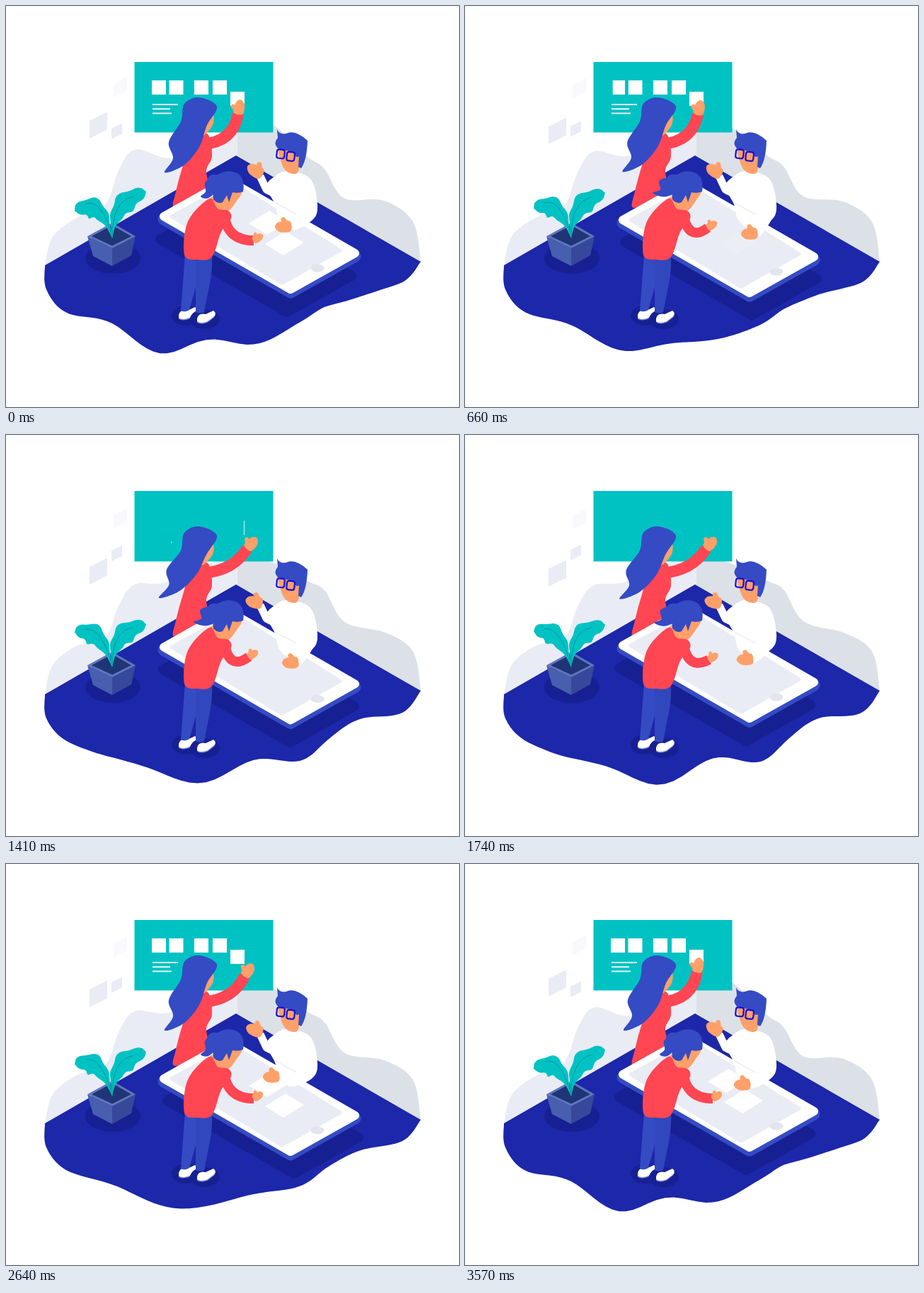
Recreate the animation shown at these times as an HTML page. Size 640x566 px, loop 3600 ms.

```html
<!DOCTYPE html>
<html lang="en">
<head>
<meta charset="utf-8">
<title>Team workshop</title>
<style>
html, body { margin: 0; width: 100%; height: 100%; overflow: hidden; background: #fff; }
svg { display: block; width: 100vw; height: 100vh; }
</style>
</head>
<body>
<svg id="stage" viewBox="0 0 640 566"></svg>
<script>
const LOOP = 3600, STEP = 30, TAU = 2 * Math.PI;
const NAVY = '#1c27a9', SHADE = '#172092', BLUE = '#344bc4', TEAL = '#00c2c3';
const RED = '#ff4652', SKIN = '#ffa06a', PALE = '#e9ecf4', WHITE = '#fff';
const stage = document.getElementById('stage');
const updates = [];

// drawing helpers
function add(tag, attrs, parent = stage) {
  const el = document.createElementNS('http://www.w3.org/2000/svg', tag);
  for (const k in attrs) el.setAttribute(k, attrs[k]);
  return parent.appendChild(el);
}
const path = (d, fill, parent) => add('path', { d, fill }, parent);
const poly = (points, fill, parent) => add('polygon', { points, fill }, parent);
const oval = (cx, cy, rx, ry, fill, parent) => add('ellipse', { cx, cy, rx, ry, fill }, parent);
const line = (d, stroke, width, cap = 'round') => add('path', {
  d, stroke, fill: 'none', 'stroke-width': width, 'stroke-linecap': cap, 'stroke-linejoin': 'round' });
const set = (el, name, value) => updates.push(t => el.setAttribute(name, value(t)));

// dense points of a smooth curve through a few key points
function spline(text, open) {
  const p = text.split(' ').map(s => s.split(',').map(Number)), n = p.length, out = [];
  const at = i => open ? p[Math.max(0, Math.min(n - 1, i))] : p[(i + n) % n];
  for (let i = 0; i < (open ? n - 1 : n); i++)
    for (let u = 0; u < 1; u += 0.1)
      out.push([0, 1].map(k => {
        const a = at(i - 1)[k], b = at(i)[k], c = at(i + 1)[k], d = at(i + 2)[k];
        return b + u * ((c - a) / 2 + u * (a - 2.5 * b + 2 * c - d / 2 + u * (1.5 * (b - c) + (d - a) / 2)));
      }));
  if (open) out.push(p[n - 1]);
  return out;
}
const join = pts => pts.map(q => q[0].toFixed(1) + ',' + q[1].toFixed(1)).join(' ');
const curve = (text, fill) => poly(join(spline(text)), fill);

// soft shape whose points are shifted by a rule over time
function bend(text, fill, rule, corner) {
  const pts = spline(text, !!corner), el = poly('', fill);
  set(el, 'points', t => join(pts.map(([x, y]) => rule(x, y, t)).concat(corner ? [corner] : [])));
}

// timing
const ease = u => (1 - Math.cos(Math.PI * Math.min(1, Math.max(0, u)))) / 2;
const pulse = (a, b, c, d) => t => ease((t - a) / (b - a)) - ease((t - c) / (d - c));
const mix = (a, b, k) => a + (b - a) * k;
const swing = t => Math.cos(TAU * t / LOOP);
const drift = t => (1 - swing(t)) / 2;
const bob = t => (1 - Math.cos(2 * TAU * t / LOOP)) / 2;
const reach = pulse(550, 1120, 2430, 3030);
const sway = pulse(550, 930, 1500, 2160);
const draw = pulse(30, 390, 1560, 2130);
const wave = pulse(940, 1390, 2350, 3000);

// drifting tiles
[[118, 162, 25, 27, PALE], [149, 173, 15, -11, PALE], [152, 110, 19, 4, '#f8f8fd']]
  .forEach(([x, y, w, rise, fill]) => {
    const el = path(`M${x} ${y}l${w} ${-w / 2}v${w}l${-w} ${w / 2}z`, fill);
    set(el, 'transform', t => `translate(0 ${rise * drift(t)})`);
  });

// walls and floor: edges ripple, pinned at both ends
const pin = x => Math.sin(Math.PI * (x - 55) / 531);
const ripple = (amp, peak, length) => (x, y, t) =>
  [x, y + amp * pin(x) * swing(t) * Math.cos(TAU * (x - peak) / length)];
const wallEdge = ripple(9, 460, 200);
bend('55,366 66,325 100,298 140,284 160,235 183,207 235,209 327,165', PALE, wallEdge, [327, 212]);
bend('327,165 372,172 426,209 450,224 478,267 535,277 575,305 586,361', '#dce1e8', wallEdge, [327, 212]);
bend('586,361 560,391 500,405 455,427 415,454 350,467 237,486 150,452 85,432 57,400 55,366',
  NAVY, ripple(11, 205, 150), [325, 211]);

// board
add('rect', { x: 181.5, y: 79, width: 196, height: 99.5, fill: TEAL });
function wipe(x, y, w, h, out, back) {
  const el = add('rect', { y, height: h, fill: WHITE });
  const gone = t => ease((t - out) / 480), shown = t => ease((t - back) / 480);
  set(el, 'x', t => t < back ? x + w * gone(t) : x);
  set(el, 'width', t => w * (t < back ? 1 - gone(t) : shown(t)));
}
[206, 230.5, 266, 292, 317].forEach((x, i) =>
  wipe(x, i < 4 ? 105 : 121, 20, 20, 545 + 60 * i + 13 * i * i, 1740 + 40 * i + 16 * i * i));
[36, 25, 27].forEach((w, i) => wipe(207, 138.2 + 6.2 * i, w, 1.8, 655 + 165 * i, 1860 + 160 * i));

// plant
oval(151, 356, 39, 22, SHADE);
poly('115,325 150,342 150,367 123,353', '#485eae');
poly('150,342 183,325 177,352 150,367', '#37489a');
poly('115,325 150,306 183,325 150,342', '#6076bd');
poly('121,325 150,309.5 177,325 150,338.5', '#1f3576');

// leaf: lobed width along a curved rib
function leaf(cx, cy, tipX, tipY, droop) {
  const el = poly('', TEAL), rib = line('', '#00979f', 1);
  const tip = t => tipY + droop * swing(t);
  set(el, 'points', t => {
    const left = [], right = [], ty = tip(t);
    for (let s = 0; s <= 1.001; s += 0.04) {
      const r = 1 - s;
      const x = r * r * 150 + 2 * r * s * cx + s * s * tipX, dx = r * (cx - 150) + s * (tipX - cx);
      const y = r * r * 328 + 2 * r * s * cy + s * s * ty, dy = r * (cy - 328) + s * (ty - cy);
      const w = 14 * Math.sqrt(Math.abs(Math.sin(Math.PI * s ** 1.2))) * Math.min(1, 0.15 + 1.5 * s)
        * (1 + 0.14 * Math.cos(20 * s)) / Math.hypot(dx, dy);
      left.push([x - dy * w, y + dx * w]);
      right.unshift([x + dy * w, y - dx * w]);
    }
    return join(left.concat(right));
  });
  set(rib, 'd', t => `M150 326Q${cx} ${cy} ${mix(cx, tipX, 0.6)} ${mix(cy, tip(t), 0.5)}`);
}
leaf(135, 270, 97, 283, 6);
leaf(150, 276, 198, 265, -3);

// mitten with a thumb, pointing right from the wrist
function hand(size, flip, place) {
  const g = add('g', { fill: SKIN });
  poly(join(spline('0,-6 9,-7 17,-5 20,1 13,7 0,6')), SKIN, g);
  add('path', { d: 'M4 -3L9 -9', stroke: SKIN, 'stroke-width': 6, 'stroke-linecap': 'round' }, g);
  set(g, 'transform', t => {
    const [x, y, angle] = place(t);
    return `translate(${x} ${y}) rotate(${angle}) scale(${size} ${flip * size})`;
  });
}

// standing woman
curve('262,186 285,181 291,212 283,232 284,265 239,285 240,262 252,218', RED);
curve('291,154 292,168 279,183 270,180', SKIN);
const woman = t => [mix(328, 341, reach(t)), mix(152, 160, reach(t))];
const sleeve = line('', RED, 16, 'butt');
set(sleeve, 'd', t => `M278 195Q321 192 ${woman(t)}`);
hand(1, 1, t => [...woman(t), mix(-80, -48, reach(t))]);
bend('273,129 298,142 284,168 273,199 251,225 224,235 236,215 230,192 247,163 252,138', BLUE,
  (x, y, t) => {
    const k = sway(t) * Math.max(0, y - 165) / 70;
    return [x - 8 * k, y - 5 * k];
  });

// phone
const slab = (dy, color, width, parent) => add('path', {
  d: `M223 ${297 + dy}L314 ${246 + dy}L493 ${349 + dy}L402 ${400 + dy}Z`,
  fill: color, stroke: color, 'stroke-width': width, 'stroke-linejoin': 'round' }, parent);
const shadow = slab(32, SHADE, 14);
set(shadow, 'transform', t => `translate(${mix(-5, 5, bob(t))} ${5 * bob(t)})`);
const phone = add('g', {});
set(phone, 'transform', t => `translate(0 ${6 * bob(t)})`);
slab(4, BLUE, 17, phone);
slab(0, WHITE, 12, phone);
add('path', { d: 'M234 297L320 250L472 345L390 391Z', fill: PALE, stroke: PALE,
  'stroke-width': 5, 'stroke-linejoin': 'round' }, phone);
oval(440, 370, 9.5, 5.5, '#e2e5ee', phone);

// tiles on the screen, pulled along by the hands
function tile(x, y, dx, dy, fade) {
  const el = poly('-27,1 2,-17 28,-1 -1,17', WHITE, phone);
  set(el, 'transform', t => `translate(${x + dx * draw(t)} ${y + dy * draw(t)})`);
  set(el, 'opacity', t => 1 - fade(t));
}
tile(393, 335, -10, -5, pulse(350, 750, 2020, 2400));
tile(370, 306, -26, -14, pulse(100, 600, 1950, 2500));

// man
curve('368,255 379,241 398,233 430,244 440,281 433,302 404,314 386,302 380,280', WHITE);
line('M359 240L368 259L388 269', WHITE, 11, 'butt');
line('M381 278L410 294', '#e6e9f3', 1.2);
const slide = pulse(1560, 2130, 2640, 3600);
const palm = t => [402 + 10 * draw(t) - 17 * slide(t), 311 + 10 * draw(t) - 11 * slide(t)];
const cuff = line('', WHITE, 13, 'butt');
set(cuff, 'd', t => `M432 290Q424 306 ${palm(t)}`);
hand(1.1, -1, t => [...palm(t), 178]);
hand(1.15, -1, t => [361, 238, mix(212, 193, wave(t))]);
curve('385,198 408,200 415,214 412,235 399,235 390,224', SKIN);
path('M383 174Q386 182 396 180Q408 174 426 190Q425 218 417 229L413 227L414 212Q409 216 408 207Q396 204 384 201Q377 194 384 186Z', BLUE);
for (const x of [383, 397.5])
  add('rect', { x, y: 202 + (x - 383) / 4, width: 11, height: 12.5, rx: 3, fill: 'none',
    stroke: '#160fd6', 'stroke-width': 2.2, transform: `rotate(6 ${x} 204)` });

// girl: shoes, legs, body
for (const [x, y] of [[256, 434], [282, 439]]) {
  oval(x - 1, y + 3, 21, 14, SHADE);
  for (const [dy, color] of [[1.5, '#7f8cd8'], [0, WHITE]])
    add('path', { d: `M${x - 12} ${y + 2 + dy}q2 -8 12 -6l11 -5q5 3 1 8l-9 7q-10 4 -15 0z`, fill: color });
}
path('M253 350L272 354L270 390L259 429Q253 433 247 430Z', BLUE);
path('M268 355L291 350Q292 372 288 392L280 432Q274 435 268 432Z', '#3147bd');
curve('288,272 318,260 333,262 326,275 314,289 299,288', SKIN);
curve('287,272 257,304 252,351 271,358 291,354 304,319 318,300 314,289 299,286', RED);
const girl = t => [mix(350, 343, draw(t)), mix(331, 313, draw(t))];
const arm = line('', RED, 14, 'butt');
set(arm, 'd', t => `M308 292Q${mix(311, 315, draw(t))} ${mix(331, 334, draw(t))} ${girl(t)}`);
hand(0.75, 1, t => [...girl(t), -32]);
path('M284 247Q285 236 299 238Q314 229 328 237Q338 244 335 262Q328 265 320 263L315 277L312 267L306 277Q299 280 293 273L292 262Q280 258 284 247Z', BLUE);
bend('291,243 281,250 282,262 275,269 286,271 298,258', BLUE, (x, y, t) => {
  const k = draw(t) * Math.max(0, 292 - x) / 17;
  return [x - 10 * k, y - 5 * k];
});

const start = performance.now();
function frame(now) {
  const t = Math.floor((Math.max(0, now - start) % LOOP) / STEP) * STEP;
  updates.forEach(f => f(t));
  requestAnimationFrame(frame);
}
frame(start);
</script>
</body>
</html>
```
